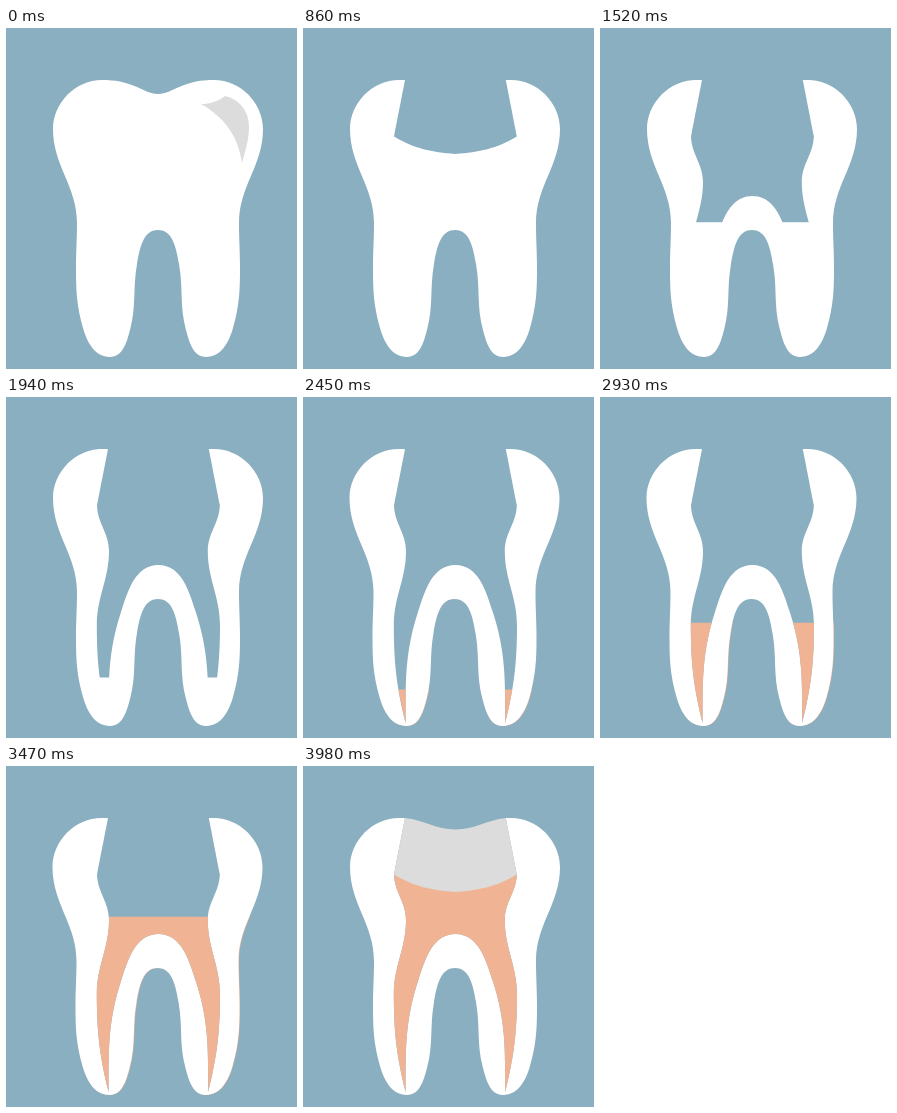
An HTML page that plays this animation: 291 px wide and 341 px high, repeating every 4810 ms.

```html
<!DOCTYPE html>
<html lang="en">
<head>
<meta charset="utf-8">
<title>Root canal</title>
<style>
  html, body { margin: 0; width: 100%; height: 100%; overflow: hidden; background: #8aafc1; }
  svg { display: block; width: 291px; height: 341px; }
  .white { fill: #fff; }
  .back { fill: #8aafc1; }
  .pink { fill: #f0b495; }
  .grey { fill: #dcdcdc; }
</style>
</head>
<body>
<svg viewBox="0 0 291 341">
  <defs>
    <clipPath id="drainClip"><rect id="drainRect" width="291" height="0"/></clipPath>
    <clipPath id="fillClip"><rect id="fillRect" width="291" height="341"/></clipPath>
    <path id="tooth"/>
    <path id="pulp"/>
  </defs>
  <g id="under" class="pink" clip-path="url(#fillClip)"><use href="#tooth"/></g>
  <use id="shell" href="#tooth" class="white"/>
  <path id="opening" class="back"/>
  <g class="back" clip-path="url(#drainClip)"><use href="#pulp"/></g>
  <g id="filling" class="pink" clip-path="url(#fillClip)"><use href="#pulp"/></g>
  <path id="crown" class="grey"/>
  <path id="shine" class="grey"/>
</svg>
<script>
const LOOP = 4810, TICK = 30;
const SHINE_OFF = 430, OPEN = 500, DRAIN = 830, FILL = 2180, CROWN = 3980;
const AXIS = 152, INNER_AXIS = 152.4;
const $ = id => document.getElementById(id);

// Smooth curve through keys [x, y, heading in degrees]; handles follow the chord length.
// A repeated point with a new heading makes a corner.
function curve(keys) {
  const points = [keys[0].slice(0, 2)];
  for (let i = 1; i < keys.length; i++) {
    const [ax, ay, aDeg] = keys[i - 1], [bx, by, bDeg] = keys[i];
    const reach = 0.38 * Math.hypot(bx - ax, by - ay);
    const a = aDeg * Math.PI / 180, b = bDeg * Math.PI / 180;
    points.push(
      [ax + reach * Math.cos(a), ay + reach * Math.sin(a)],
      [bx - reach * Math.cos(b), by - reach * Math.sin(b)],
      [bx, by]);
  }
  return points;
}

function setPath(id, [start, ...rest]) {
  $(id).setAttribute('d', `M${start}C${rest.join(' ')}Z`);
}

// Keys run down the left half from the axis and back to it; the right half is the mirror image.
function setMirrored(id, axis, keys) {
  const left = curve(keys);
  const right = left.slice(0, -1).reverse().map(([x, y]) => [2 * axis - x, y]);
  setPath(id, [...left, ...right]);
}

setMirrored('tooth', AXIS, [
  [AXIS, 66, 180], [131, 59, 202], [96, 52, 180], [47, 101, 90],
  [71, 195, 90], [70, 240, 90], [77, 300, 74], [104, 329, 0],
  [124, 302, -75], [131, 236, -80], [AXIS, 202, 0]
]);

// The pulp starts slightly above the rim so that it overlaps the opening.
setMirrored('pulp', INNER_AXIS, [
  [INNER_AXIS, 125, 185], [91, 107.5, 211], [91, 107.5, 90],
  [103, 154, 90], [90.8, 228, 90], [102.6, 326, 76],
  [102.6, 326, -90], [115, 215, -72], [INNER_AXIS, 168, 0]
]);

const cut = [[102, 52, 101], [91, 108.5, 101], [91, 108.5, 31], [INNER_AXIS, 126, 5]];
setMirrored('crown', INNER_AXIS, [[INNER_AXIS, 63.5, 180], [102, 52, 186], ...cut]);
setMirrored('opening', INNER_AXIS, [[INNER_AXIS, 50, 180], [102, 50, 180], ...cut]);

setPath('shine', curve([
  [195, 76, 0], [219, 68, -36], [219, 68, 12], [243, 98, 90],
  [236, 135, 105], [236, 135, -98], [195, 76, -150]
]));

const show = (id, on) => $(id).setAttribute('visibility', on ? 'visible' : 'hidden');
const ticks = (t, from) => Math.max(0, Math.floor((t - from) / TICK));

function draw(t) {
  const filling = t >= FILL && t < CROWN;
  show('shine', t < SHINE_OFF);
  show('opening', t >= OPEN);
  show('crown', t >= CROWN);
  show('filling', t >= FILL);
  show('under', filling);
  $('shell').setAttribute('x', filling ? -0.5 : 0);

  $('drainRect').setAttribute('height', t < DRAIN ? 0 : 52.4 + 6.167 * ticks(t, DRAIN));
  $('fillRect').setAttribute('y', 329.9 - 4.167 * ticks(t, FILL));
}

const begin = performance.now();
function frame() {
  draw((performance.now() - begin) % LOOP);
  requestAnimationFrame(frame);
}
frame();
</script>
</body>
</html>
```
